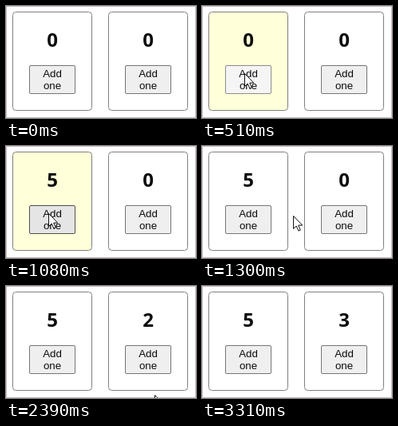
Animation of 238x140 px, one loop 3670 ms. Source, as an HTML page:

```html
<!DOCTYPE html>
<html lang="en">
<head>
<meta charset="utf-8">
<title>Counters</title>
<style>
  html, body { margin: 0; width: 100%; height: 100%; overflow: hidden; background: #fff; }
  svg { display: block; width: 100%; height: 100%; }
  text { text-anchor: middle; fill: #0c0c0c; }
  .count { font: 700 24px "Open Sans", "Noto Sans", sans-serif; }
  .label { font: 13.333px "Liberation Sans", Arial, sans-serif; }
</style>
</head>
<body>
<svg viewBox="0 0 238 140">
  <rect x=".5" y=".5" width="237" height="139" fill="#fff" stroke="#c9bcbc"/>
  <g id="cards"></g>
  <path id="cursor" d="M.5 .5V16.5L4.2 13L6.9 19.1L9.3 18.1L6.7 12.1H11.8Z" fill="#fff" stroke="#111"/>
</svg>
<script>
const LOOP = 3670;
const cursor = document.getElementById('cursor');

// Where the pointer stops
const away = { x: 152, y: 145 };
const left = { x: 53, y: 84 };
const edge = { x: 156, y: 95 };
const right = { x: 167, y: 98 };
const below = { x: 190, y: 143 };
const back = { x: 199, y: 122 };
const again = { x: 174, y: 99 };

// Each move follows a quadratic curve from a to b, bent towards c
const moves = [
  { from: 40, to: 300, steps: 10, a: away, c: { x: 103, y: 65 }, b: left },
  { from: 1060, to: 1570, steps: 15, a: left, c: { x: 73, y: 77 }, b: edge },
  { from: 1600, to: 1640, steps: 2, a: edge, c: edge, b: right },
  { from: 2190, to: 2440, steps: 7, a: right, c: right, b: below },
  { from: 2830, to: 2990, steps: 6, a: back, c: again, b: again },
  { from: 3150, to: 3310, steps: 6, a: again, c: again, b: below }
];

// Runs of n evenly spaced clicks
const cards = [
  { x: 8, runs: [{ at: 460, every: 220, hold: 100, n: 2 }, { at: 880, every: 40, hold: 20, n: 3 }] },
  { x: 128, runs: [{ at: 1800, every: 160, hold: 50, n: 2 }, { at: 3030, every: 0, hold: 50, n: 1 }] }
];

function make(parent, tag, attrs, text = '') {
  const node = document.createElementNS('http://www.w3.org/2000/svg', tag);
  for (const key in attrs) node.setAttribute(key, attrs[key]);
  node.textContent = text;
  return parent.appendChild(node);
}

for (const card of cards) {
  const g = make(document.getElementById('cards'), 'g', { transform: `translate(${card.x} 7)` });
  card.box = make(g, 'rect', { x: .5, y: .5, width: 99, height: 123, rx: 4, stroke: '#808080' });
  card.count = make(g, 'text', { class: 'count', x: 50, y: 44 });
  card.button = make(g, 'rect', { x: 21.5, y: 67.5, width: 57, height: 35, rx: 1.5 });
  make(g, 'text', { class: 'label', x: 50, y: 82 }, 'Add');
  make(g, 'text', { class: 'label', x: 50, y: 97 }, 'one');
}

function pointerAt(t) {
  const move = moves.findLast(m => t >= m.from);
  if (!move) return away;
  const { from, to, steps, a, b, c } = move;
  const k = Math.min(1, Math.floor((t - from) / (to - from) * steps + 1e-6) / steps);
  const s = 1 - (1 - k) ** 2;
  const curve = axis => Math.round((1 - s) ** 2 * a[axis] + 2 * s * (1 - s) * c[axis] + s * s * b[axis]);
  return { x: curve('x'), y: curve('y') };
}

function clicksAt(runs, t) {
  let count = 0, down = false;
  for (const { at, every, hold, n } of runs) {
    for (let i = 0; i < n; i++) {
      const since = t - at - i * every;
      if (since >= hold) count++;
      else if (since >= 0) down = true;
    }
  }
  return { count, down };
}

const within = (p, x, y, w, h) => p.x >= x && p.x < x + w && p.y >= y && p.y < y + h;

function render(t) {
  const tip = pointerAt(t);
  cursor.setAttribute('transform', `translate(${tip.x} ${tip.y})`);
  for (const card of cards) {
    const { count, down } = clicksAt(card.runs, t);
    const over = within(tip, card.x, 7, 100, 124);
    const hover = within(tip, card.x + 21, 74, 58, 36);
    card.box.setAttribute('fill', over ? '#ffffd9' : '#fff');
    card.button.setAttribute('fill', down ? '#f5f5f5' : hover ? '#e5e5e5' : '#efefef');
    card.button.setAttribute('stroke', down ? '#8d8d8d' : hover ? '#505050' : '#767676');
    card.count.textContent = count;
  }
}

const start = performance.now();
function tick() {
  render((performance.now() - start) % LOOP);
  requestAnimationFrame(tick);
}
tick();
</script>
</body>
</html>
```
